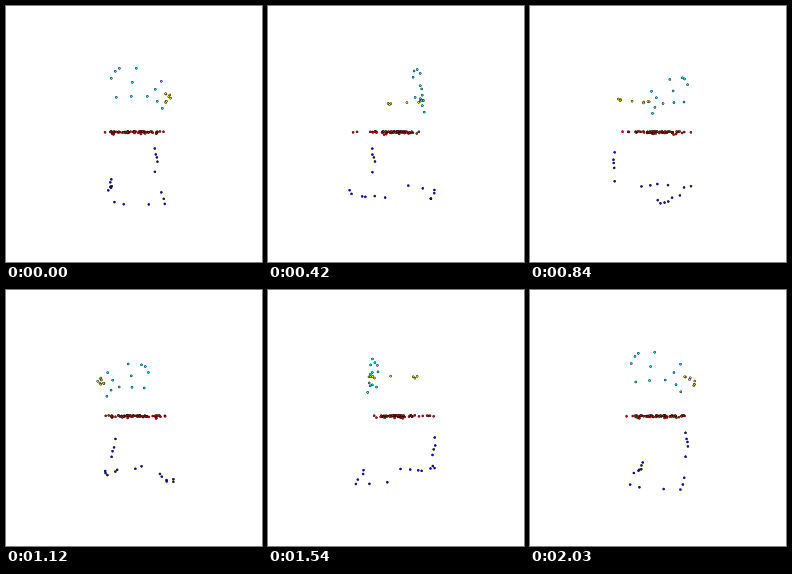
These frames come from a looping animation (256 by 256 pixels, 2.1 s). A matplotlib script:

```python
import numpy as np
import matplotlib.pyplot as plt
from matplotlib.animation import FuncAnimation

SIZE, FRAMES, STEP_MS = 256, 30, 70
CX, CY, DIST = 128.3, 126.3, 234

# Chair parts as (across, toward viewer, up), in pixels from the seat centre
back = [(-20.8, 22.4, 48.8), (-17.2, 22.4, 55.2), (-13.4, 24.4, 57.3),
        (1.8, 23.9, 57.5), (-1.8, 24.8, 44.7), (-16.2, 23.2, 31.5),
        (-2.7, 25, 32.1), (11.6, 25, 32.1), (19, 22.4, 38.9),
        (24.6, 20.7, 46.5), (25.2, 23.3, 21.6), (20.8, 22.1, 28.1)]

arm = [(28.5, 21.4, 35), (29, 19.7, 35), (33, 17.1, 34.6), (32.2, 15.7, 33.3),
       (36.2, 1, 34), (34.6, -21.3, 33.7), (34, -19.4, 32.3), (34.5, -18, 33.4)]

post = [(23.7, -36.6, -18.7), (24.9, -37, -25.6), (26, -35.6, -28.9),
        (26.6, -34.5, -33.7), (23.8, -36.5, -45.7)]
right_runner = [(26.4, 5.3, -58.7), (26.8, 21.4, -60.5), (26.1, 34, -61.2)]
rear_bar = [(12.3, 36, -61), (-8.9, 36.1, -60.8), (-16.7, 37.6, -58.6)]
left_runner = [(-26.2, -2, -58.5), (-24.5, -12.8, -58.5), (-26.2, -21.5, -59.5),
               (-25, -25.3, -59.7), (-27.6, -35, -57.5), (-26.7, -37.5, -54.5)]
legs = post + right_runner + rear_bar + left_runner


def make_seat(n=54):
    """Flat scatter, denser toward the back and narrower at the front."""
    rng = np.random.default_rng(4)
    depth = rng.triangular(-36, 4, 20, n)
    across = rng.uniform(-27, 27, n) * np.where(depth < -22, 0.75, 1)
    up = rng.uniform(-0.8, 1, n) - 2 * (rng.random(n) < 0.12)
    corners = [(-19, -38, 0), (-20.5, -33, 0.4), (27, 17, 0.5), (-27, 18, 0),
               (10, -33, 0.5), (20, -30, 0.6)]
    return np.vstack([np.column_stack([across, depth, up]), corners])


parts = [(make_seat(), "#ff0000"), (legs, "#0000ff"),
         (back, "#00ffff"), (arm, "#ffff00")]
points = np.vstack([p for p, _ in parts])
colors = np.array([c for p, c in parts for _ in p])


def project(angle):
    """Turn about the vertical axis, then apply perspective."""
    x, y, z = points.T
    c, s = np.cos(angle), np.sin(angle)
    depth = y * c - x * s
    scale = DIST / (DIST - depth)
    xy = np.column_stack([CX + (x * c + y * s) * scale, CY - z * scale])
    return xy, np.argsort(depth)


fig = plt.figure(figsize=(SIZE / 72, SIZE / 72), dpi=72, facecolor="white")
ax = fig.add_axes([0, 0, 1, 1])
ax.set(xlim=(0, SIZE), ylim=(SIZE, 0))
ax.axis("off")
dots = ax.scatter(points[:, 0], points[:, 1], s=4, c=colors,
                  edgecolors="black", linewidths=0.5)


def update(i):
    xy, order = project(2 * np.pi * i / FRAMES)
    dots.set_offsets(xy[order])
    dots.set_facecolors(colors[order])
    return dots,


anim = FuncAnimation(fig, update, frames=FRAMES, interval=STEP_MS,
                     repeat=True, repeat_delay=0)
plt.show()
```
